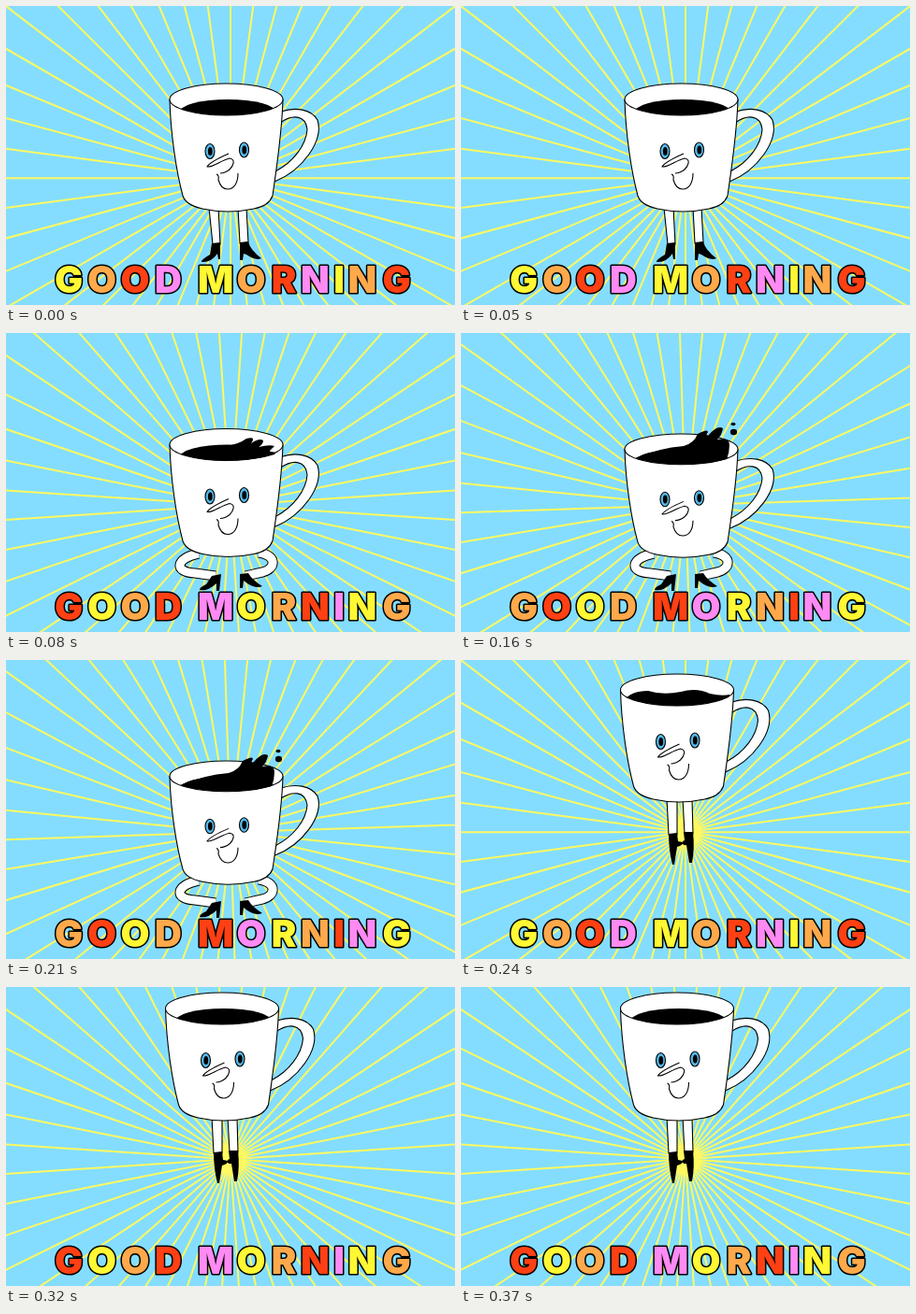
Write an HTML page with a canvas that moves like this. It is 480 by 320 pixels and loops after 400 ms.

```html
<!DOCTYPE html>
<html lang="en">
<head>
<meta charset="utf-8">
<title>Good morning</title>
<style>
html, body { margin: 0; width: 100%; height: 100%; overflow: hidden; background: #84ddff; }
canvas { display: block; }
</style>
</head>
<body>
<canvas id="stage" width="480" height="320"></canvas>
<script>
const ctx = document.getElementById('stage').getContext('2d');
const STEP = 80;
const SKY = '#84ddff', RAY = '#fff95f', INK = '#000', WHITE = '#fff', IRIS = '#54b9e9';
const YELLOW = '#fff833', ORANGE = '#ffa94b', RED = '#ff4013', PINK = '#ff8af4';
const LETTER_COLORS = [YELLOW, ORANGE, RED, PINK];

// Each letter with the centre of its slot.
const LETTERS = [['G', 67], ['O', 102.5], ['O', 138], ['D', 173.5], ['M', 224], ['O', 262],
  ['R', 297], ['N', 330.5], ['I', 356], ['N', 381], ['G', 417.5]];

const path = d => new Path2D(d);

const MUG = path('M175 100 C176 137 182 177 189 203 Q192 213 210 217 Q237 223 265 217 Q281 214 285 203 C289 175 295 137 296 100 Z');
const HANDLE = path('M294 113 C309 108 326 110 333 122 C340 144 317 176 287 188 L288 177 C307 167 321 149 322 132 C320 116 306 116 293 125 Z');
const NOSE = path('M238 158 C229 162 218 167 215 172 C221 173 230 165 239 163 C246 164 243 171 239 175 Q234 179 229 179');
const SMILE = path('M225 180 Q228 181 227 186 C229 193 233 196 237 196 C244 196 248 189 248 179');

const STANDING = {
  tubes: [path('M217 216 L221 255 L229 255 L227 216 Z'), path('M248 216 L250 254 L259 253 L257 216 Z')],
  boots: [path('M220 254 L229 253 L229 271 L227 271 L226 265 Q219 275 209 274 Q208 272 218 266 Z'),
    path('M250 253 L259 252 Q261 261 273 270 Q267 273 257 266 L254 265 L253 272 L250 272 Z')]
};
const CROUCHED = {
  bends: [path('M206 236 C181 241 179 256 202 257 L224 260'), path('M270 235 C291 238 288 253 274 256 L256 260')],
  boots: [path('M220 260 L230 258 L228 276 L225 276 L225 268 Q215 277 207 275 Q207 272 214 269 Z'),
    path('M250 258 L259 257 Q263 264 274 271 Q267 274 258 268 L254 265 L253 273 L250 273 Z')]
};
const FLYING = {
  tubes: [path('M220 148 L222 187 L231 187 L231 148 Z'), path('M237 148 L239 186 L248 186 L247 148 Z')],
  boots: [path('M222 186 L231 185 L232 194 L237 195 Q238 198 231 200 L228 219 L226 219 Q222 203 222 186 Z'),
    path('M238 184 L248 184 Q250 202 247 217 L244 217 L241 198 Q236 199 237 194 L239 193 Z')]
};

const SPLASH = path('M190 130 Q215 122 235 121 Q249 119 257 113 Q268 110 262 118 Q271 112 275 115 Q275 119 270 122 Q282 119 287 121 Q284 124 281 127 Q291 127 287 130 Q262 138 230 135 Z');
const BIG_SPLASH = path('M186 134 Q212 123 238 121 Q249 118 253 108 Q264 102 264 106 Q261 110 264 110 Q274 98 280 102 Q279 109 274 114 Q287 111 287 120 Q287 128 284 135 Q255 143 225 138 Z');
const WAVE = path('M174 44 Q181 33 200 33 Q216 38 235 34 Q252 29 266 36 Q279 39 287 37 L287 54 L174 54 Z');

const POSES = [
  { turn: 0, shift: 0, x: 0, y: 0, legs: STANDING },
  { turn: 0.5, shift: 1, x: 0, y: 19.5, legs: CROUCHED, splash: SPLASH },
  { turn: -0.25, shift: 2, x: 0, y: 25, squash: 0.965, legs: CROUCHED, splash: BIG_SPLASH, drops: true },
  { turn: 0, shift: 0, x: -4.5, y: -68, legs: FLYING, wave: WAVE },
  { turn: 0.5, shift: 1, x: -4.5, y: -77, legs: FLYING, legLift: -9 }
];

function shape(p, fill = WHITE) {
  ctx.fillStyle = fill;
  ctx.fill(p);
  ctx.stroke(p);
}

function oval(x, y, rx, ry, fill) {
  const p = new Path2D();
  p.ellipse(x, y, rx, ry, 0, 0, Math.PI * 2);
  if (fill) {
    ctx.fillStyle = fill;
    ctx.fill(p);
  }
  return p;
}

function drawRays(turn) {
  const count = 48;
  ctx.strokeStyle = RAY;
  ctx.lineWidth = 2;
  ctx.beginPath();
  for (let i = 0; i < count; i++) {
    const angle = (i + turn) * Math.PI * 2 / count;
    ctx.moveTo(240, 184.3);
    ctx.lineTo(240 + 400 * Math.cos(angle), 184.3 + 400 * Math.sin(angle));
  }
  ctx.stroke();
}

function drawLegs({ tubes = [], bends = [], boots }, lift = 0) {
  ctx.save();
  ctx.translate(0, lift);
  tubes.forEach(p => shape(p));
  for (const p of bends) {
    for (const [color, width] of [[INK, 11], [WHITE, 9]]) {
      ctx.strokeStyle = color;
      ctx.lineWidth = width;
      ctx.stroke(p);
    }
  }
  ctx.fillStyle = INK;
  boots.forEach(p => ctx.fill(p));
  ctx.restore();
}

function drawMug({ x, y, squash = 1, splash, wave, drops }) {
  ctx.save();
  ctx.translate(x, 83 + y);
  ctx.scale(1, squash);
  ctx.translate(0, -83);
  shape(HANDLE);
  shape(MUG);
  const rim = oval(235.5, 100, 60.5, 17, WHITE);
  if (!wave) {
    ctx.save();
    ctx.clip(rim);
    oval(237, 114, 52, 14, INK);
    ctx.restore();
  }
  ctx.stroke(rim);
  for (const [ex, ey] of [[218, 155.5], [254.5, 154]]) {
    ctx.stroke(oval(ex, ey, 5, 8, IRIS));
    oval(ex + 0.3, ey, 2.4, 4.6, INK);
  }
  ctx.stroke(NOSE);
  ctx.stroke(SMILE);
  ctx.restore();

  ctx.fillStyle = INK;
  if (splash) ctx.fill(splash);
  if (wave) {
    ctx.save();
    ctx.clip(oval(235.5 + x, 100 + y, 60.5, 17));
    ctx.fill(wave);
    ctx.restore();
  }
  if (drops) {
    oval(291.5, 106, 3.6, 3.2, INK);
    oval(291, 97.5, 2.5, 1.8, INK);
  }
}

function letterColor(index, shift) {
  const slot = (index - shift + LETTERS.length) % LETTERS.length;
  return LETTER_COLORS[slot % LETTER_COLORS.length];
}

function drawGreeting(shift) {
  ctx.font = '900 40px Inter, "Liberation Sans", sans-serif';
  ctx.textAlign = 'center';
  ctx.lineWidth = 3;
  LETTERS.forEach(([char, x], i) => {
    ctx.strokeText(char, x, 306.5);
    ctx.fillStyle = letterColor(i, shift);
    ctx.fillText(char, x, 306.5);
  });
}

function draw(now) {
  const pose = POSES[Math.floor(now / STEP) % POSES.length];
  ctx.fillStyle = SKY;
  ctx.fillRect(0, 0, 480, 320);
  drawRays(pose.turn);
  ctx.strokeStyle = INK;
  ctx.lineWidth = 1.1;
  ctx.lineJoin = 'round';
  drawLegs(pose.legs, pose.legLift);
  drawMug(pose);
  drawGreeting(pose.shift);
}

const start = performance.now();
function tick() {
  draw(performance.now() - start);
  requestAnimationFrame(tick);
}
tick();
</script>
</body>
</html>
```
